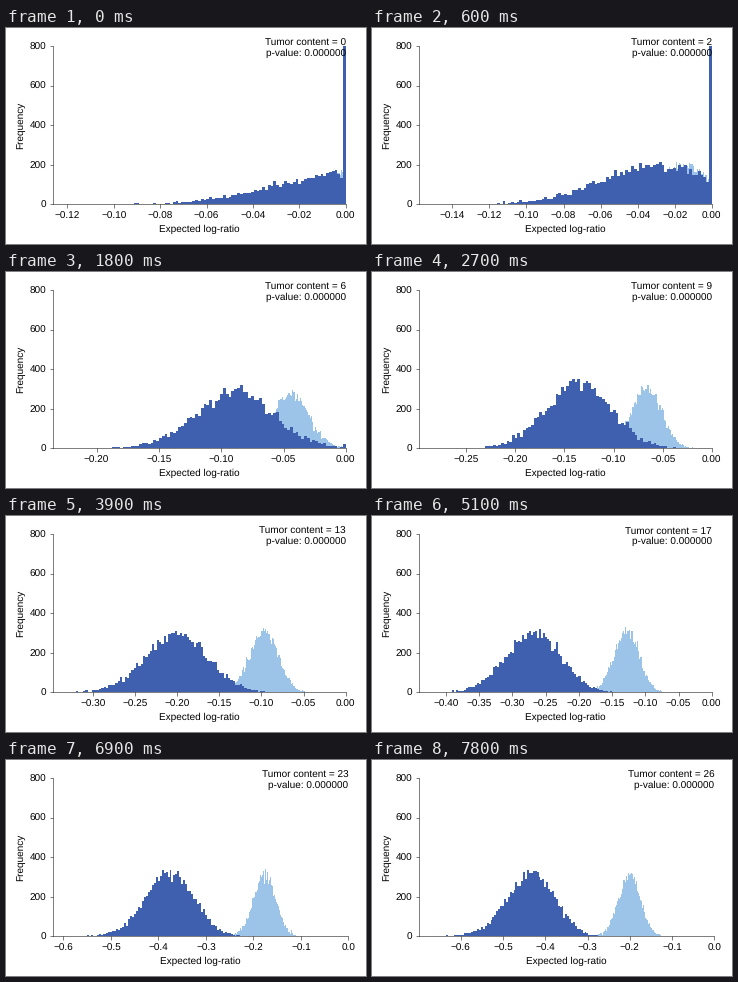
Recreate the animation shown at these times as a matplotlib script. Size 360 by 216 pixels, loop 8000 ms.

```python
import numpy as np
import matplotlib.pyplot as plt
from matplotlib.animation import FuncAnimation

WIDTH, HEIGHT, DPI = 360, 216, 72
LEFT, TOP, BASE = 47, 18, 176.4
CAPTION_TOP = 10.2
DARK, LIGHT = "#3f60ae", "#9cc4e9"
SAMPLES, BINS = 10000, 100
STEPS_PER_STATE = 3
TICK = 100

# Width of the x axis for each tumor content, 0 to 26 percent
SPANS = [.1262, .145, .158, .177, .193, .207, .235, .262, .28,
         .298, .314, .325, .336, .347, .368, .39, .418, .4405,
         .45, .49, .53, .58, .592, .622, .645, .67, .6985]

plt.rcParams.update({
    "font.family": "Liberation Sans",
    "font.size": 10,
    "text.hinting": "none",
    "axes.linewidth": .5,
    "xtick.major.width": .5,
    "ytick.major.width": .5,
    "axes.spines.top": False,
    "axes.spines.right": False,
})


def log_ratio_hist(rng, loss, spread, low=None):
    """Histogram of log2 ratios, capped at zero, around log2(1 - loss)."""
    level = 1 - loss
    noise = rng.normal(0, spread * level * np.log(2), SAMPLES)
    values = np.minimum(np.log2(level + noise), 0)
    mean = np.log2(level)
    if low is None:
        low = mean - 3.9 * spread
    high = min(0, mean + 3.9 * spread)
    return np.histogram(values, np.linspace(low, high, BINS + 1))


def make_state(content):
    rng = np.random.default_rng(200 + content)
    spread = .030 + 4e-5 * content ** 2
    dark = log_ratio_hist(rng, content / 100, spread, -SPANS[content] / 1.05)
    light = log_ratio_hist(rng, content / 200, .46 * spread)
    return dark, light


def tick_style(span):
    """Tick step, decimals and right edge of the axes in pixels."""
    if span > .45:
        return .1, 1, 342.4
    if span > .225:
        return .05, 2, 339.8
    if span > .18:
        return .025, 3, 337
    return .02, 2, 339.8


states = [make_state(content) for content in range(len(SPANS))]

fig = plt.figure(figsize=(WIDTH / DPI, HEIGHT / DPI), dpi=DPI, facecolor="white")
ax = fig.add_axes([.13, .18, .8, .73])
ax.set_ylim(0, 800)
ax.set_yticks(range(0, 801, 200))
ax.set_xlabel("Expected log-ratio")
ax.set_ylabel("Frequency")

(dark, light) = states[0]
light_bars = ax.stairs(*light, fill=True, color=LIGHT, zorder=1)
dark_bars = ax.stairs(*dark, fill=True, color=DARK, zorder=1.1)
caption = ax.text(1, (BASE - CAPTION_TOP) / (BASE - TOP), "",
                  transform=ax.transAxes, ha="right", va="top", zorder=5)


def update(frame):
    content = min(frame // STEPS_PER_STATE, len(SPANS) - 1)
    span = SPANS[content]
    step, decimals, right = tick_style(span)
    ax.set_position([LEFT / WIDTH, 1 - BASE / HEIGHT,
                     (right - LEFT) / WIDTH, (BASE - TOP) / HEIGHT])

    sizes = step * np.arange(int(span / step + 1e-6) + 1)
    labels = [("\u2212" if size else "") + f"{size:.{decimals}f}" for size in sizes]
    ax.set_xticks(-sizes, labels)
    ax.set_xlim(-span, 0)

    for bars, (counts, edges) in zip((dark_bars, light_bars), states[content]):
        bars.set_data(counts, edges)
    caption.set_text(f"Tumor content = {content}\np-value: 0.000000")
    return dark_bars, light_bars, caption


anim = FuncAnimation(fig, update, frames=80, interval=TICK,
                     init_func=lambda: update(0), repeat=True,
                     repeat_delay=0, blit=False)
plt.show()
```
